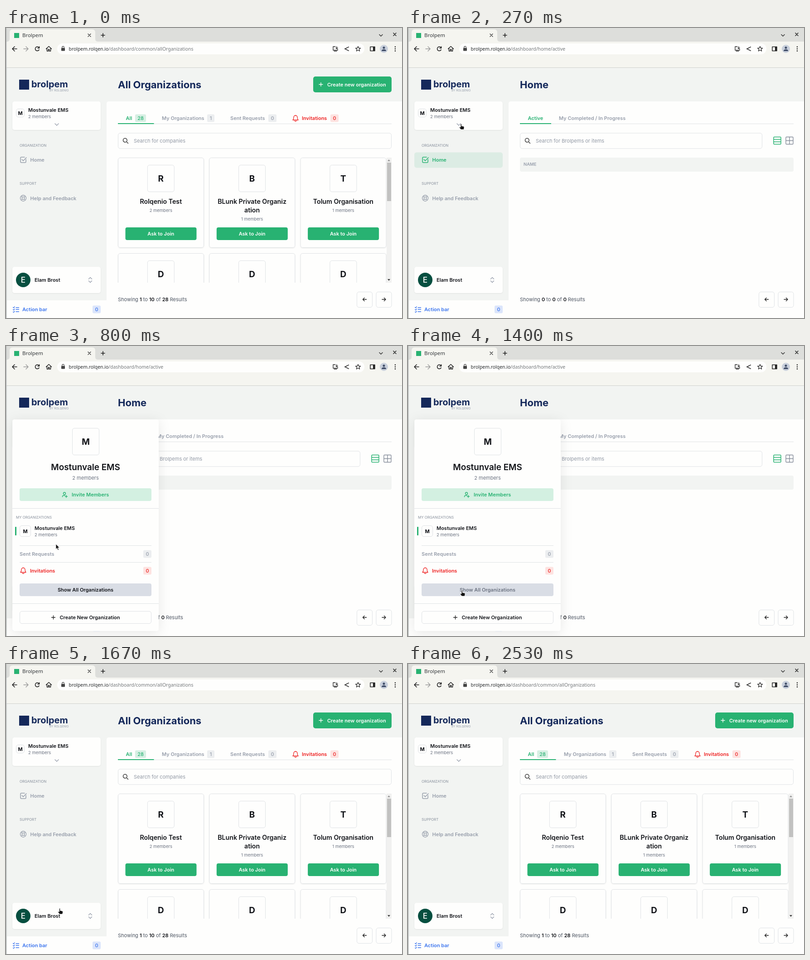
These frames come from a looping animation (874x640 px, 2670 ms). An HTML page:

```html
<!DOCTYPE html>
<html lang="en">
<head>
<meta charset="utf-8">
<title>Organization switcher</title>
<style>
html, body { margin: 0; width: 100%; height: 100%; overflow: hidden; background: #fefefd; }
svg { display: block; width: 874px; height: 640px; font-family: Inter, sans-serif; white-space: pre; }
.chrome { font-family: "Noto Sans", sans-serif; }
</style>
</head>
<body>
<svg id="stage" viewBox="0 0 874 640"></svg>
<script>
const GREEN = '#28b272', NAVY = '#14285a', INK = '#111318', GRAY = '#979eab', MUTED = '#6b7280';
const RED = '#ee2020', BLUE = '#3a74ee', PAPER = '#fefefd', PANEL = '#f2f4f2', LINE = '#dfe2e5';
const LOOP = 2670, TICK = 200 / 3;
const ORG = 'Mostunvale EMS', HOST = 'brolpem.rolqen.io';

// cy is the middle of the capitals
const text = (x, cy, str, size = 11, weight = 400, fill = INK, anchor = 'start', more = '') =>
  `<text x="${x}" y="${cy + size * .364}" font-size="${size}" font-weight="${weight}" fill="${fill}" text-anchor="${anchor}" ${more}>${str}</text>`;
const mid = (x, cy, str, size, weight, fill) => text(x, cy, str, size, weight, fill, 'middle');
const rect = (x, y, w, h, r, fill, stroke = 'none') =>
  `<rect x="${x}" y="${y}" width="${w}" height="${h}" rx="${r}" fill="${fill}" stroke="${stroke}"/>`;
const box = (x, y, w, h, r = 4.5) => rect(x + .5, y + .5, w - 1, h - 1, r, PAPER, LINE);
const icon = (x, y, d, color = GRAY, width = 1.3) =>
  `<path transform="translate(${x} ${y})" d="${d}" fill="none" stroke="${color}" stroke-width="${width}" stroke-linecap="round" stroke-linejoin="round"/>`;
const hline = (x1, x2, y, color = LINE) => rect(x1, y, x2 - x1, 1, 0, color);
const badge = (cx, cy, str, fg = GRAY, bg = '#eceef0', w = 18) =>
  rect(cx - w / 2, cy - 8.5, w, 17, 3, bg) + mid(cx, cy, str, 11, 500, fg);
const avatar = (x, y, size, letter, fontSize) =>
  box(x, y, size, size) + mid(x + size / 2, y + size / 2, letter, fontSize, 700, INK);
const group = (id, body) => `<g id="${id}">${body}</g>`;

const PLUS = 'M-4 0H4M0-4V4', CROSS = 'M-3-3L3 3M3-3L-3 3', DOWN = 'M-4-2L0 2L4-2';
const LEFT = 'M4 0H-4M-.5-3.5L-4 0L-.5 3.5', RIGHT = 'M-4 0H4M.5-3.5L4 0L.5 3.5';
const BELL = 'M-6 4H6C4 2 4.2 0 4-2A4 4 0 0 0-4-2C-4.2 0-4 2-6 4ZM-2 6Q0 7.5 2 6';
const CHECKBOX = 'M6-1V4Q6 6 4 6H-4Q-6 6-6 4V-4Q-6-6-4-6H3M-3-1L0 2L7-5';
const circle = r => `M${-r} 0a${r} ${r} 0 1 0 ${2 * r} 0a${r} ${r} 0 1 0 ${-2 * r} 0`;

function browser() {
  return `<g class="chrome">` +
    rect(0, 0, 874, 31, 0, '#dddedb') +
    `<path d="M2 30Q8 30 8 24V10Q8 3 15 3H190Q197 3 197 10V24Q197 30 203 30H874V88H2Z" fill="#f5f5f0"/>` +
    rect(18, 11, 11, 11, 0, GREEN) + text(36, 16, 'Brolpem', 11.4, 400, '#33373a') +
    icon(184, 16, CROSS, '#333') + icon(214, 16, PLUS, '#222', 1.6) +
    icon(827.5, 16, 'M-3.5-1.5L0 2L3.5-1.5', '#333', 1.5) + icon(858, 14, CROSS, '#222', 1.5) +
    rect(113, 34, 678, 24, 12, PAPER) +
    icon(19, 46, 'M5 0H-5M0-5L-5 0L0 5', '#222', 1.6) + icon(44, 46, 'M-5 0H5M0-5L5 0L0 5', '#999', 1.4) +
    icon(69, 46, 'M4 2A4.5 4.5 0 1 1 3.5-3M4.5-5V-1.5H1', '#222', 1.6) +
    icon(94.5, 46, 'M-6 0L0-5.5L6 0M-4-1.5V5H-1V1H1V5H4V-1.5', '#222', 1.5) +
    rect(122, 44, 8, 6.5, 1, '#444') + icon(126, 43.5, 'M-2.2 1V-1A2.2 2.2 0 0 1 2.2-1V1', '#444', 1.2) +
    text(138.5, 46, `<tspan fill="#25282b">${HOST}</tspan><tspan id="path"></tspan>`, 10.4, 400, '#73777a') +
    icon(727, 46, 'M0-5H-5V3H5V1M-3 5H3M3-5V0M1-2L3 0L5-2', '#333', 1.4) +
    icon(752, 46, 'M4-4L-4 0L4 4M3.5-4h1M-4.5 0h1M3.5 4h1', '#333', 1.4) +
    icon(777, 46, 'M0-5.5L1.6-1.7L5.5-1.5L2.5 1L3.5 5L0 2.8L-3.5 5L-2.5 1L-5.5-1.5L-1.6-1.7Z', '#333') +
    icon(809, 46, 'M-5-4.5H5V4.5H-5Z', '#222', 1.5) + rect(810, 41.5, 4, 9, 0, '#222') +
    `<circle cx="834" cy="46" r="9" fill="#c9d0dc"/><circle cx="834" cy="43.5" r="2.5" fill="#43506a"/><path d="M829 51Q829 47 834 47T839 51Z" fill="#43506a"/>` +
    icon(859, 46, 'M0-4.5V-4.4M0 0V.1M0 4.5V4.6', '#222', 2.6) +
    hline(0, 874, 87, '#d0d1ce') + '</g>';
}

function sidebar() {
  return rect(0, 88, 874, 552, 0, PANEL) +
    `<path d="M222 640V167Q222 162 227 162H874V640Z" fill="${PAPER}"/>` +
    rect(29, 114, 22, 22, 0, NAVY) + text(56, 124, 'brolpem', 20, 700, NAVY) +
    text(96, 138, 'BY ROLQENIO', 6.3, 400, GRAY) +
    `<g filter="url(#soft)">${rect(14, 162, 195, 63, 5, PAPER) + rect(14, 527, 195, 58, 5, PAPER)}</g>` +
    avatar(22, 178, 19, 'M', 11) + text(49, 181, ORG, 11, 600) +
    text(49, 195.5, '2 members', 9.45, 400, MUTED) + icon(112, 213, DOWN) +
    text(30, 259, 'ORGANIZATION', 7.9, 400, '#858d9a') +
    rect(14, 274.5, 195, 34, 5, '#dcece4').replace('<rect', '<rect id="homeRow"') +
    `<g id="homeLink">${icon(38, 291, CHECKBOX, 'currentColor', 1.5) + text(53.5, 291, 'Home', 11, 600, 'currentColor')}</g>` +
    text(30, 343, 'SUPPORT', 7.9, 400, '#858d9a') +
    icon(38, 375.5, circle(6.5) + circle(2.8).replace('M', 'M') + 'M-4.5-4.5L-2-2M4.5-4.5L2-2M-4.5 4.5L-2 2M4.5 4.5L2 2') +
    text(53.5, 375.5, 'Help and Feedback', 11, 600, GRAY) +
    `<circle cx="38" cy="556" r="16" fill="#064f40"/>` + mid(38, 556, 'E', 17, 500, PAPER) +
    text(63, 556, 'Elam Brost', 11, 600) + icon(186, 556, 'M-3.5-2L0-5.5L3.5-2M-3.5 2L0 5.5L3.5 2') +
    rect(2, 601, 220, 39, 0, PAPER) +
    icon(22, 621, 'M-6.5-4.5L-5-3.2L-3-6M-6.5 .5L-5 1.7L-3-1M-6.5 5.5L-5 6.5L-3 4M0-4H6.5M0 0H6.5M0 5H6.5', BLUE) +
    text(36, 621, 'Action bar', 11, 600, BLUE) + badge(200, 621, '0', BLUE, '#dbe5fb');
}

const search = (w, hint) => box(247, 231.5, w, 35) +
  icon(263.5, 248.5, 'M-5-.8a4.3 4.3 0 1 0 8.6 0a4.3 4.3 0 1 0-8.6 0M2.6 2.6L6 6', '#222') +
  text(282, 249, hint, 11, 400, '#9299a5');
const tabLine = w => hline(247, 851, 211) + rect(247, 210, w, 2, 0, GREEN);
const results = (a, b, c) => text(247, 599,
  ['Showing ', a, ' to ', b, ' of ', c, ' Results'].map((s, i) =>
    i % 2 ? `<tspan font-weight="600" fill="${INK}">${s}</tspan>` : s).join(''), 11, 400, '#4d5562');
const pager = () => box(774, 582, 35, 35) + box(816.5, 582, 35, 35) +
  icon(791.5, 599, LEFT, '#222', 1.4) + icon(834, 599, RIGHT, '#222', 1.4);

function homePage() {
  return text(247, 124.5, 'Home', 22, 700, NAVY) + tabLine(69) +
    text(264.5, 199, 'Active', 11, 600, GREEN) + text(333, 199, 'My Completed / In Progress', 11, 600, GRAY) +
    search(535, 'Search for Brolpems or items') +
    icon(815, 248.5, 'M-6.5-8H6.5Q8-8 8-6.5V6.5Q8 8 6.5 8H-6.5Q-8 8-8 6.5V-6.5Q-8-8-6.5-8ZM-8-2.7H8M-8 2.7H8', GREEN, 1.5) +
    icon(842, 248.5, 'M-6.5-8H6.5Q8-8 8-6.5V6.5Q8 8 6.5 8H-6.5Q-8 8-8 6.5V-6.5Q-8-8-6.5-8ZM-8 0H8M0-8V8', '#858d9a', 1.4) +
    rect(247, 286, 604, 31, 4, PANEL) + text(255, 301, 'NAME', 9.45, 600, GRAY) + results(0, 0, 0);
}

function card(col, y, letter, lines, members) {
  const x = 247 + col * 201.3, cx = x + 94.8, extra = (lines.length - 1) * 19;
  return `<g filter="url(#soft)">${box(x, y, 190, 199)}</g>` + avatar(cx - 30, y + 16, 60, letter, 18.9) +
    lines.map((s, i) => mid(cx, y + 97 + i * 19, s, 14.2, 600, INK)).join('') +
    mid(cx, y + 117 + extra, members, 9.45, 400, MUTED) +
    rect(x + 16.5, y + 154, 157, 28, 4, GREEN) + mid(cx, y + 168, 'Ask to Join', 11, 600, PAPER);
}

function listPage() {
  const cards = card(0, 286, 'R', ['Rolqenio Test'], '2 members') +
    card(1, 286, 'B', ['BLunk Private Organiz', 'ation'], '1 members') +
    card(2, 286, 'T', ['Tolum Organisation'], '1 members') +
    [0, 1, 2].map(c => card(c, 497, 'D', [''], '')).join('');
  return text(247, 124.5, 'All Organizations', 22, 700, NAVY) +
    rect(678, 107, 173, 35, 5, GREEN) + icon(695, 124.5, PLUS, PAPER) +
    text(709, 124.5, 'Create new organization', 11, 600, PAPER) + tabLine(79.5) +
    text(264.5, 199, 'All', 11, 600, GREEN) + badge(297, 199, '28', GREEN, '#d7efe3', 24) +
    text(344, 199, 'My Organizations', 11, 600, GRAY) + badge(452, 199, '1', GRAY, '#eceef0', 16) +
    text(495, 199, 'Sent Requests', 11, 600, GRAY) + badge(588, 199, '0') +
    icon(639, 199, BELL, RED) + text(653, 199, 'Invitations', 11, 600, RED) + badge(725, 199, '0', RED, '#fde3e1') +
    search(604, 'Search for companies') +
    group('empty', results(0, 0, 0)) +
    group('loaded', `<g clip-path="url(#list)">${cards}</g>` +
      rect(840, 286, 11, 276, 0, '#f1f1f0') + rect(841, 297, 9, 85, 0, '#c1c1c0') +
      `<path d="M842 294L845 290L848 294Z" fill="#999"/><path d="M842 554L845 558L848 554Z" fill="#444"/>` +
      results(1, 10, 28));
}

function popup() {
  return `<g filter="url(#deep)">${rect(14, 162, 323, 467, 5, PAPER)}</g>` +
    avatar(146, 181, 60, 'M', 18.9) + mid(175.5, 267.5, ORG, 18.9, 600, INK) +
    mid(175.5, 291, '2 members', 11, 400, MUTED) +
    rect(30, 314, 291, 28, 4, '#d3f0e1') +
    icon(130, 328, 'M-3.5-2.5a2.5 2.5 0 1 0 5 0a2.5 2.5 0 1 0-5 0M-5.5 5V4Q-5.5 2-3 2H0M3 1.5V6.5M.8 4H5.5', GREEN) +
    text(145, 328, 'Invite Members', 11, 600, GREEN) + hline(14, 337, 358) +
    text(22, 378, 'MY ORGANIZATIONS', 7.9, 400, '#858d9a') + rect(20, 399, 3, 19, 1, GREEN) +
    avatar(30, 396, 25, 'M', 11) + text(63, 402, ORG, 11, 600) +
    text(63, 416.5, '2 members', 9.45, 400, MUTED) + hline(30, 321, 440) +
    text(30, 459, 'Sent Requests', 11, 600, GRAY) + badge(312, 459, '0') + hline(30, 321, 477) +
    icon(38, 495.5, BELL, RED) + text(53, 496, 'Invitations', 11, 600, RED) + badge(312, 496, '0', RED, '#fde3e1') +
    rect(30, 524, 291, 28, 4, '#d9dde5') +
    text(175.5, 538, 'Show All Organizations', 11, 600, INK, 'middle', 'id="showAll"') + hline(14, 337, 568) +
    box(30, 585, 291, 28) + icon(104.5, 599, PLUS, '#222') + text(118.5, 599, 'Create New Organization', 11, 600);
}

const stage = document.getElementById('stage');
stage.innerHTML = `<defs>
  <clipPath id="list"><rect x="246" y="285" width="594" height="277"/></clipPath>
  <filter id="soft" x="-5%" y="-10%" width="110%" height="125%"><feDropShadow dx="0" dy="1" stdDeviation="1" flood-opacity=".08"/></filter>
  <filter id="deep" x="-20%" y="-20%" width="140%" height="140%"><feDropShadow dx="0" dy="4" stdDeviation="13" flood-opacity=".09"/></filter>
  </defs>` + browser() + sidebar() + group('home', homePage()) + group('all', listPage()) + pager() +
  rect(0, 0, 1.5, 640, 0, '#b8bcbb') + group('popup', popup()) +
  `<path id="cursor" fill="#111" stroke="#fff" stroke-width=".8"/>`;
const el = id => document.getElementById(id);
const show = (id, on) => el(id).style.display = on ? '' : 'none';

const ARROW = 'M0 0V11.5L2.6 9L4.6 13.5L6.5 12.6L4.6 8.3H8Z';
const HAND = 'M-1 1Q0-.6 1.2 1V5.2L5.5 6Q7.2 6.5 7 8.5L6.2 13H-.4L-4 8.2Q-3.4 6.8-1 8Z';
const PATH = [[1, 117, 211], [7, 117, 211], [8, 117, 222], [10, 112, 330], [11, 110, 391], [12, 110, 437],
  [14, 107, 462], [19, 119, 535], [20, 119, 539], [22, 119, 539], [23, 118.5, 539], [32, 118.5, 539],
  [33, 119, 539], [36, 119, 539], [37, 118, 536], [38, 118, 536]];

function cursorAt(k) {
  const i = Math.max(1, PATH.findIndex(p => p[0] >= k));
  const [a, b] = [PATH[i - 1], PATH[i]], u = (k - a[0]) / (b[0] - a[0]);
  return [a[1] + (b[1] - a[1]) * u, a[2] + (b[2] - a[2]) * u];
}

// cubic-bezier(0, 0, .2, 1)
function easeOut(x) {
  if (x <= 0) return 0;
  if (x >= 1) return 1;
  let lo = 0, hi = 1;
  for (let i = 0; i < 20; i++) {
    const s = (lo + hi) / 2;
    if (.6 * (1 - s) * s * s + s * s * s < x) lo = s; else hi = s;
  }
  return 3 * (1 - lo) * lo * lo + lo * lo * lo;
}

const tickTime = k => Math.round(k * TICK / 10) * 10;
function tickAt(t) {
  let k = 0;
  while (k < 39 && tickTime(k + 1) <= t) k++;
  return k;
}

function render(time) {
  const k = tickAt(time % LOOP), atHome = k >= 1 && k < 23;
  show('home', atHome);
  show('all', !atHome);
  show('homeRow', atHome);
  show('empty', k === 23 || k === 24);
  show('loaded', k < 23 || k >= 25);
  el('homeLink').style.color = atHome ? GREEN : GRAY;
  el('path').textContent = '/dashboard/' + (atHome ? 'home/active' : 'common/allOrganizations');

  const p = atHome ? easeOut((tickTime(k) - 360) / 200) : 0, scale = .95 + .05 * p;
  show('popup', p > 0);
  el('popup').setAttribute('opacity', p);
  el('popup').setAttribute('transform', `translate(175.5 162) scale(${scale}) translate(-175.5 -162)`);
  el('showAll').setAttribute('fill', k < 20 ? INK : k < 21 ? '#434955' : MUTED);

  const visible = k >= 1 && k < 38;
  show('cursor', visible);
  if (visible) {
    el('cursor').setAttribute('d', k >= 6 && k < 19 ? ARROW : HAND);
    el('cursor').setAttribute('transform', `translate(${cursorAt(k)})`);
  }
}

const start = performance.now();
function loop() {
  render(performance.now() - start);
  requestAnimationFrame(loop);
}
loop();
</script>
</body>
</html>
```
